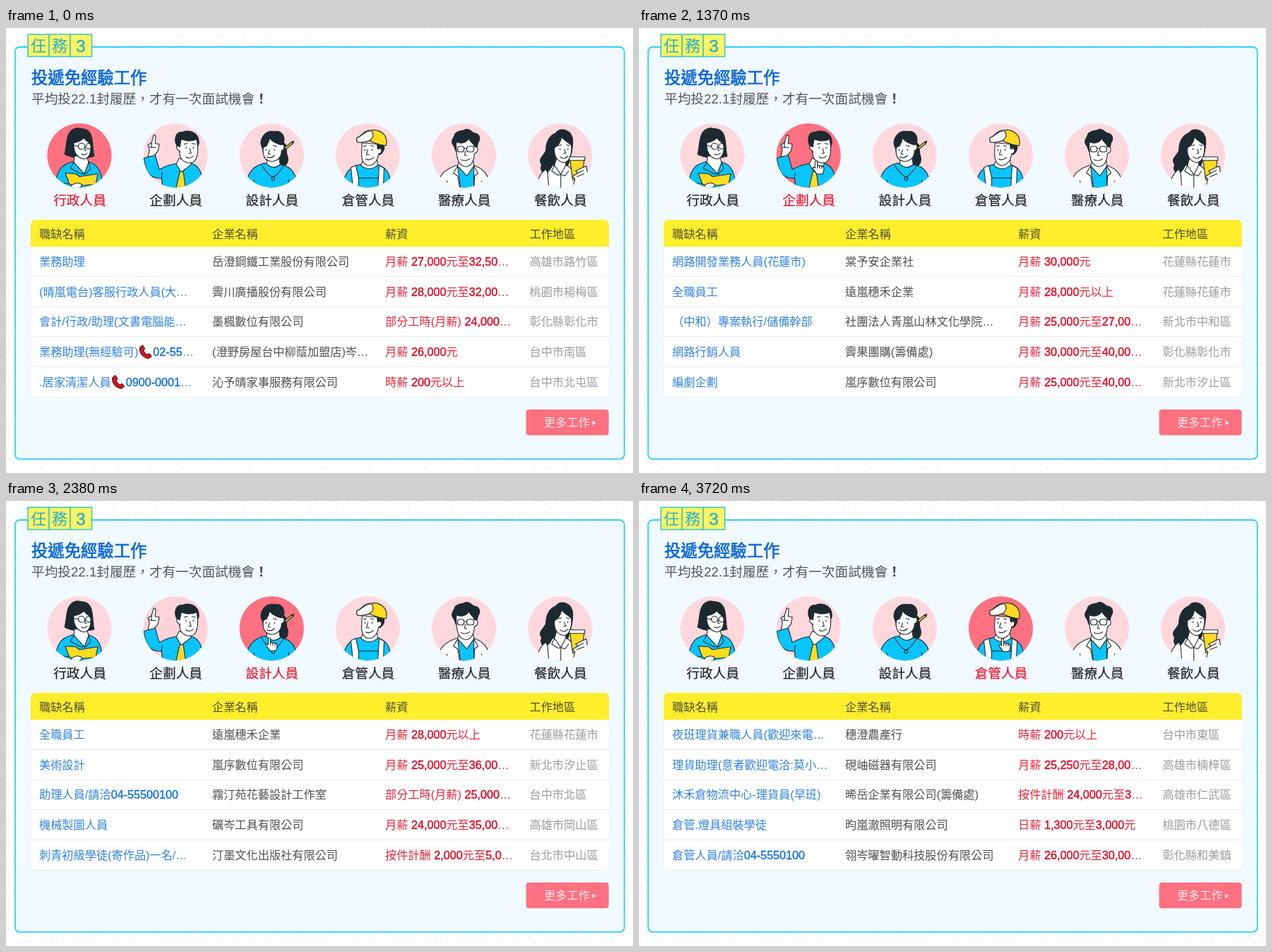
These frames come from a looping animation (888 by 631 pixels, 4620 ms). An HTML page:

```html
<!DOCTYPE html>
<html lang="zh-Hant">
<head>
<meta charset="utf-8">
<title>投遞免經驗工作</title>
<style>
html, body { margin: 0; width: 100%; height: 100%; overflow: hidden; background: #fff; }
svg { display: block; }
text { font-family: "Liberation Sans", "Noto Sans CJK TC", "Noto Sans CJK", sans-serif; font-weight: 300; font-size: 16.2px; fill-opacity: .86; }
.num { fill-opacity: 1; stroke-width: .35px; }
.tab { font-size: 22px; fill: #25b0d2; text-anchor: middle; fill-opacity: 1; }
.tab.num { font-size: 24px; stroke: #25b0d2; stroke-width: .5px; }
.title { font-size: 23.33px; fill: #0b66dc; stroke: #0b66dc; stroke-width: .7px; fill-opacity: 1; }
.lead { font-size: 18.67px; fill: #3c3c3c; }
.lead tspan { font-weight: 700; fill: #222; }
.label { font-size: 18.67px; text-anchor: middle; fill: #222; stroke: #222; stroke-width: .2px; fill-opacity: 1; }
.label.on { fill: #ee1530; stroke: #ee1530; }
.head { fill: #333; }
.c0 { fill: #0f6fdb; }
.c0 .num, .c0.num { stroke: #0f6fdb; }
.c1 { fill: #333; }
.c2 { fill: #e2001a; }
.c2 .num { stroke: #e2001a; }
.c3 { fill: #8c8c8c; }
.art { stroke: #1d2930; stroke-width: 1.1; stroke-linejoin: round; stroke-linecap: round; fill: none; }
.k { fill: #1d2930; }
.w { fill: #fff; }
.b { fill: #08c5ff; }
.y { fill: #fedb1e; }
</style>
</head>
<body>
<svg width="888" height="631" viewBox="0 0 888 631">
  <defs>
    <pattern id="dots" width="15.540" height="15.540" patternUnits="userSpaceOnUse">
      <g fill="#bfe8f0"><circle cx="3" cy="3" r=".9"/><circle cx="10.770" cy="10.770" r=".9"/></g>
    </pattern>
    <clipPath id="round"><circle r="45.500"/></clipPath>
    <clipPath id="sheet"><rect x="35" y="272" width="819" height="251" rx="7"/></clipPath>
    <path id="phone" d="M2,-12 L6,-15.500 L9.500,-10.500 L7.500,-8 C8.500,-5 10.500,-3 13,-2 L16,-3.500 L19,.5 L15,3.500 C7,3 1,-4 2,-12Z" fill="#d8101c" stroke="#2a1512" stroke-width="1"/>

    <g id="p0">
      <path class="k" d="M-3,-39 C-21,-37 -17,-14 -21,-2 C-12,4 10,5 21,1 C17,-10 23,-37 4,-38Z"/>
      <path class="b" d="M-34,46 C-33,20 -25,13 -10,9 L13,9 C27,13 32,24 33,46Z"/>
      <path class="w" d="M-7,1 L-8,10 L7,26 L13,10 L10,0Z"/>
      <path class="w" d="M-8,-18 C-2,-19 3,-21 6,-25 C9,-20 15,-19 16,-14 C17,-2 12,5 6,5 C-2,4 -7,-3 -8,-12Z"/>
      <circle cx="3" cy="-13" r="4.500"/><circle cx="13" cy="-13" r="4"/>
      <path d="M-8,-14 L-1,-13 M8,-12 L8,-7 L10,-7 M3,-2 Q7,1 11,-3 M-8,10 L-13,18 L2,26 L7,26 M13,10 L16,19 L8,27"/>
      <path class="y" d="M-20,25 L-5,26 L0,30 L26,26 L23,41 L-13,44Z"/>
      <path class="b" d="M-34,46 C-30,38 -20,38 -10,42 L-10,46Z"/>
      <path class="w" d="M-11,42 Q-2,36 4,42 L1,46 L-11,46Z"/>
    </g>
    <g id="p1">
      <path class="b" d="M-45,4 L-29,-1 L-23,20 C-13,14 -5,12 4,11 L22,11 C35,15 38,26 39,46 L-18,46 L-20,32 C-36,34 -42,24 -45,4Z"/>
      <path class="w" d="M-39,2 L-37,-8 L-39,-15 L-34,-18 L-31,-29 L-28,-28 L-29,-17 L-23,-16 L-25,-6 L-30,0Z"/>
      <path d="M-34,-18 L-34,-11 M-37,-12 L-28,-11 M-20,32 L-19,24"/>
      <path class="w" d="M5,4 L1,12 L8,24 L22,13 L22,9Z"/>
      <path class="k" d="M0,-18 C-2,-28 3,-34 10,-33 C16,-37 34,-35 33,-17 L30,-8 L6,-4Z"/>
      <path class="w" d="M6,-6 C-1,-10 1,-16 6,-12 L8,-23 C16,-20 23,-20 30,-23 C32,-12 33,0 27,8 C22,13 9,11 6,0Z"/>
      <path d="M15,-12 L15,-10 M25,-12 L25,-10 M12,-16 L17,-17 M23,-17 L28,-16 M20,-10 L22,-3 L19,-3 M15,2 Q20,6 25,1"/>
      <path class="y" d="M6,23 L11,23 L14,45 L7,48 L1,45Z"/>
    </g>
    <g id="p2">
      <path class="k" d="M-13,-10 C-20,-22 -9,-37 4,-34 C16,-36 19,-25 17,-18 C24,-13 19,-7 22,0 C25,8 21,16 14,16 C9,17 7,10 8,2 L-12,-4Z"/>
      <path class="y" d="M18,-11 L28,-19 L30,-17 L20,-9Z"/><path class="k" d="M28,-19 L31.500,-20.500 L30,-17Z"/>
      <path class="b" d="M-37,46 C-35,25 -27,15 -11,11 L12,13 C29,15 35,27 37,46Z"/>
      <path class="w" d="M-7,3 L-7,12 Q2,21 12,13 L10,1Z"/>
      <path class="w" d="M-12,-11 C-8,-13 -4,-18 -3,-25 C1,-18 8,-17 13,-15 C18,-18 20,-9 14,-7 C14,5 4,10 -3,8 C-11,6 -13,-1 -12,-11Z"/>
      <path d="M-8,-9 L-8,-7 M4,-9 L4,-7 M-10,-13 L-6,-14 M2,-14 L7,-13 M-3,-8 L-5,-2 L-2,-2 M-7,2 Q0,5 4,0 M-14,14 Q-6,27 2,31 Q11,25 17,14 M-23,46 L-25,35 M24,46 L24,34"/>
      <circle class="b" cx="2" cy="33" r="2.300"/>
    </g>
    <g id="p3">
      <path class="b" d="M-35,46 C-34,25 -27,17 -12,13 L14,13 C28,18 32,26 33,46Z"/>
      <path class="w" d="M-24,17 L-17,14 L-13,32 L-13,46 L-21,46Z M16,14 L23,18 L22,46 L14,46 L15,32Z"/>
      <path class="w" d="M-6,6 L-10,14 Q2,24 14,14 L13,5Z"/>
      <path class="k" d="M12,-17 L22,-17 C25,-10 22,-4 17,-1 L12,-5Z"/>
      <path class="w" d="M-8,-18 L13,-16 L14,-9 C20,-13 22,-4 15,-2 C14,9 7,15 0,14 C-9,12 -10,2 -8,-18Z"/>
      <path class="y" d="M-16,-24 C-8,-28 -6,-36 6,-36 C20,-37 29,-27 26,-14 C17,-14 9,-18 2,-21 C-4,-19 -10,-18 -15,-19Z"/>
      <path class="w" d="M-16,-25 C-8,-27 -5,-35 5,-35 C9,-31 8,-24 2,-21 C-4,-19 -11,-18 -15,-19Z"/>
      <path d="M-4,-9 L-4,-7 M6,-9 L6,-7 M-6,-13 L-2,-14 M4,-14 L8,-13 M0,-8 L-2,-1 L2,-1 M-3,5 Q3,8 8,3 M-13,32 L15,32"/>
    </g>
    <g id="p4">
      <path class="w" d="M-38,46 C-35,26 -27,20 -11,14 L14,14 C29,19 35,28 38,46Z"/>
      <path class="b" d="M-9,15 L-5,46 L14,46 L14,15 L4,28Z"/>
      <path class="w" d="M-7,8 L-9,15 L4,29 L14,15 L13,6Z"/>
      <path class="k" d="M-14,-13 C-21,-21 -13,-26 -13,-30 C-9,-37 0,-34 2,-37 C9,-38 11,-33 14,-32 C24,-31 23,-22 20,-18 L17,-5 L-11,-5Z"/>
      <path class="w" d="M-11,-19 C-3,-16 3,-18 7,-24 C9,-18 14,-18 15,-12 C21,-14 21,-4 15,-3 C14,8 10,16 2,16 C-9,14 -11,3 -11,-19Z"/>
      <rect x="-9" y="-13" width="9" height="8" rx="3"/><rect x="4" y="-13" width="10" height="8" rx="3"/>
      <path d="M0,-10 L4,-10 M2,-6 L1,0 L4,0 M-4,6 Q2,9 8,5 M-9,15 L-15,25 L-9,29 L-6,46 M14,15 L20,25 L15,29 L14,46 M-24,46 L-24,36 M26,46 L25,36"/>
    </g>
    <g id="p5">
      <path class="k" d="M-6,-32 C0,-41 18,-37 18,-20 C18,-9 14,8 10,16 L-12,27 C-22,30 -30,22 -26,13 C-33,4 -21,0 -20,-8 C-20,-18 -16,-28 -6,-32Z"/>
      <path class="w" d="M-34,46 C-31,28 -24,20 -11,14 L9,14 C18,18 22,28 26,46Z"/>
      <path class="w" d="M-5,4 L-8,14 L1,27 L8,14 L8,4Z"/>
      <path class="w" d="M-8,-11 C-2,-14 1,-20 2,-26 C7,-20 13,-18 16,-14 C17,1 12,10 5,10 C-4,9 -9,1 -8,-11Z"/>
      <path class="k" d="M-9,-8 C-8,7 -10,17 -18,24 L-25,10Z"/>
      <path d="M0,-10 L0,-8 M11,-10 L11,-8 M-3,-14 L2,-15 M9,-15 L13,-14 M6,-9 L8,-3 L5,-3 M0,2 Q6,7 11,1 M-8,14 L-12,22 L-3,28 L1,27 L7,29 L12,22 M-18,20 L-16,46 M1,28 L1,46"/>
      <path class="y" d="M14,6 L34,6 L31,35 L18,35Z"/>
      <path class="w" d="M13,2 L35,2 L35,7 L13,7Z"/>
      <path class="w" d="M18,46 L21,33 L17,30 L25,25 L22,22 L30,18 L37,15 L39,26 L34,39 L32,46Z"/>
      <path d="M25,25 L33,21 M24,30 L34,26"/>
    </g>
  </defs>

  <rect width="888" height="631" fill="#fff"/>
  <rect width="888" height="631" fill="url(#dots)"/>
  <rect x="12.900" y="26.900" width="862.800" height="584.400" rx="6.500" fill="#f0faff" stroke="#14cdf0" stroke-width="1.600"/>
  <g fill="#fdf461" stroke="#3cc6cc" stroke-width="1.600">
    <rect x="31" y="9" width="30" height="31.500"/><rect x="61" y="9" width="30" height="31.500"/><rect x="91" y="9" width="30.500" height="31.500"/>
  </g>
  <text class="tab" x="46" y="33">任</text><text class="tab" x="76" y="33">務</text><text class="tab num" x="106" y="33.500">3</text>
  <text class="title" x="36" y="79">投遞免經驗工作</text>
  <text class="lead" x="36" y="106.500">平均投22.1封履歷，才有一次面試機會<tspan>！</tspan></text>
  <g id="people"></g>

  <rect x="34.500" y="300" width="820" height="224" rx="8" fill="#e6f0f5"/>
  <g clip-path="url(#sheet)">
    <rect x="35" y="272" width="819" height="252" fill="#fff"/>
    <rect x="35" y="272" width="819" height="38.300" fill="#feee2c"/>
    <path d="M35,352.500 H854 M35,395.500 H854 M35,437.500 H854 M35,480.500 H854" stroke="#e8ecef"/>
  </g>
  <g class="head">
    <text x="47" y="298">職缺名稱</text><text x="292" y="298">企業名稱</text><text x="537" y="298">薪資</text><text x="741.500" y="298">工作地區</text>
  </g>
  <g id="tables"></g>
  <rect x="736.600" y="541" width="117" height="36.600" rx="4" fill="#ff7180"/>
  <text x="762" y="565" fill="#fff">更多工作</text>
  <path d="M830.500,557 L835.500,560 L830.500,563Z" fill="#fff"/>

  <g id="cursor">
    <path d="M-1.700,9 V.5 C-1.700,-1.500 1.700,-1.500 1.700,.5 V6 C2,4.800 4.600,5 4.800,6.500 C5.500,5.400 7.700,5.800 7.900,7.300 C8.700,6.500 10.800,7 10.800,9 V12 C10.800,14.500 9.500,15 9.300,17.500 H.3 C0,15 -2.500,13.500 -4.800,9.800 C-5.700,8.200 -3.600,7 -2.300,8.400Z" fill="#fff" stroke="#1a1a1a" stroke-width="1.100" stroke-linejoin="round"/>
    <path d="M1.700,6 V9.500 M4.800,6.500 V9.800 M7.900,7.300 V10" stroke="#1a1a1a" fill="none"/>
    <circle id="press" cx=".3" cy="1.500" r="12.300" fill="#f6f01c" opacity=".58"/>
  </g>
</svg>
<script>
const NS = 'http://www.w3.org/2000/svg';
const LOOP = 4620;
const $ = id => document.getElementById(id);

function add(parent, tag, attrs, content = '') {
  const el = document.createElementNS(NS, tag);
  for (const key in attrs) el.setAttribute(key, attrs[key]);
  el.textContent = content;
  parent.append(el);
  return el;
}

const people = ['行政人員', '企劃人員', '設計人員', '倉管人員', '醫療人員', '餐飲人員'].map((name, i) => {
  const x = 104 + 136.15 * i;
  const g = add($('people'), 'g', { transform: `translate(${x} 180.7)` });
  add(g, 'circle', { r: 45.5, fill: '#ffd8dd' });
  const glow = add(g, 'circle', { r: 45.5, fill: '#ff7180', opacity: 0 });
  const clip = add(g, 'g', { 'clip-path': 'url(#round)' });
  add(clip, 'use', { href: '#p' + i, class: 'art' });
  const label = add(g, 'text', { class: 'label', x: .5, y: 70 }, name);
  return { glow, label };
});

// job | company | pay | area; ☎ stands for the handset icon
const jobs = [
  `業務助理|岳澄鋼鐵工業股份有限公司|月薪 27,000元至32,50…|高雄市路竹區
(晴嵐電台)客服行政人員(大…|霽川廣播股份有限公司|月薪 28,000元至32,00…|桃園市楊梅區
會計/行政/助理(文書電腦能…|墨楓數位有限公司|部分工時(月薪) 24,000…|彰化縣彰化市
業務助理(無經驗可)☎02-55…|(澄野房屋台中柳蔭加盟店)岑…|月薪 26,000元|台中市南區
.居家清潔人員☎0900-0001…|沁予晴家事服務有限公司|時薪 200元以上|台中市北屯區`,
  `網路開發業務人員(花蓮市)|棠予安企業社|月薪 30,000元|花蓮縣花蓮市
全職員工|遠嵐穗禾企業|月薪 28,000元以上|花蓮縣花蓮市
（中和）專案執行/儲備幹部|社團法人青嵐山林文化學院…|月薪 25,000元至27,00…|新北市中和區
網路行銷人員|霽果團購(籌備處)|月薪 30,000元至40,00…|彰化縣彰化市
編劇企劃|嵐序數位有限公司|月薪 25,000元至40,00…|新北市汐止區`,
  `全職員工|遠嵐穗禾企業|月薪 28,000元以上|花蓮縣花蓮市
美術設計|嵐序數位有限公司|月薪 25,000元至36,00…|新北市汐止區
助理人員/請洽04-55500100|霧汀苑花藝設計工作室|部分工時(月薪) 25,000…|台中市北區
機械製圖人員|礪岑工具有限公司|月薪 24,000元至35,00…|高雄市岡山區
刺青初級學徒(寄作品)一名/…|汀墨文化出版社有限公司|按件計酬 2,000元至5,0…|台北市中山區`,
  `夜班理貨兼職人員(歡迎來電…|穗澄農產行|時薪 200元以上|台中市東區
理貨助理(意者歡迎電洽:莫小…|硯岫磁器有限公司|月薪 25,250元至28,00…|高雄市楠梓區
沐禾倉物流中心-理貨員(早班)|晞岳企業有限公司(籌備處)|按件計酬 24,000元至3…|高雄市仁武區
倉管.燈具組裝學徒|昀嵐澈照明有限公司|日薪 1,300元至3,000元|桃園市八德區
倉管人員/請洽04-5550100|翎岑曜智動科技股份有限公司|月薪 26,000元至30,00…|彰化縣和美鎮`
];
const columns = [47, 292, 537, 741.5];

// Digits are set a little stronger than the characters around them.
function write(g, c, x, y, words) {
  const text = add(g, 'text', { class: 'c' + c, x, y });
  words.split(/(\d[\d,-]*)/).forEach((part, i) => {
    if (part) add(text, 'tspan', i % 2 ? { class: 'num' } : {}, part);
  });
  return x + text.getComputedTextLength();
}

const tables = jobs.map(list => {
  const g = add($('tables'), 'g', {});
  list.split('\n').forEach((row, r) => {
    const y = 337 + 42.7 * r;
    row.split('|').forEach((cell, c) => {
      const [start, tail] = cell.split('☎');
      const end = write(g, c, columns[c], y, start);
      if (!tail) return;
      add(g, 'use', { href: '#phone', x: end, y });
      write(g, c, end + 21, y, tail);
    });
  });
  return g;
});

// Each round: glide to the next person, press, then swap the list.
const rounds = [
  { from: [54, 200], to: [251, 189.5], move: [380, 830, 7], press: 910, swap: [1120, 1370, 4] },
  { from: [251, 189.5], to: [373, 195], move: [1610, 2060, 7], press: 2060, swap: [2230, 2540, 5] },
  { from: [373, 195], to: [515, 196], move: [2770, 3240, 7], press: 3240, swap: [3410, 3720, 5] }
];
const rise = [0, 0, .6, .9, 1, 1, 1];
const fall = [.65, .22, .05, 0, 0];

function step(t, [a, b, n]) {
  return t < a ? -1 : Math.min(n - 1, Math.floor((t - a + 6) / (b - a) * (n - 1)));
}

function draw(t) {
  const level = [1, 0, 0, 0, 0, 0], lit = [true];
  let shown = 0, spot = null, pressed = false;
  rounds.forEach((r, i) => {
    const m = step(t, r.move), s = step(t, r.swap);
    if (m >= 0) {
      const e = 1 - (1 - (m + 1) / 7) ** 3;
      spot = r.from.map((v, j) => v + (r.to[j] - v) * e);
      level[i + 1] = rise[m];
      lit[i + 1] = m >= 2;
    }
    if (t >= r.press && s < 0) pressed = true;
    if (s >= 0) {
      level[i] = fall[s];
      lit[i] = false;
      pressed = false;
    }
    if (s >= 1) shown = i + 1;
  });
  people.forEach((p, i) => {
    p.glow.setAttribute('opacity', level[i]);
    p.label.classList.toggle('on', !!lit[i]);
  });
  tables.forEach((g, i) => g.setAttribute('visibility', i === shown ? 'visible' : 'hidden'));
  $('cursor').setAttribute('visibility', spot ? 'visible' : 'hidden');
  if (spot) $('cursor').setAttribute('transform', `translate(${spot})`);
  $('press').setAttribute('visibility', pressed ? 'visible' : 'hidden');
}

const begin = performance.now();
function tick() {
  draw((performance.now() - begin) % LOOP);
  requestAnimationFrame(tick);
}
tick();
</script>
</body>
</html>
```
